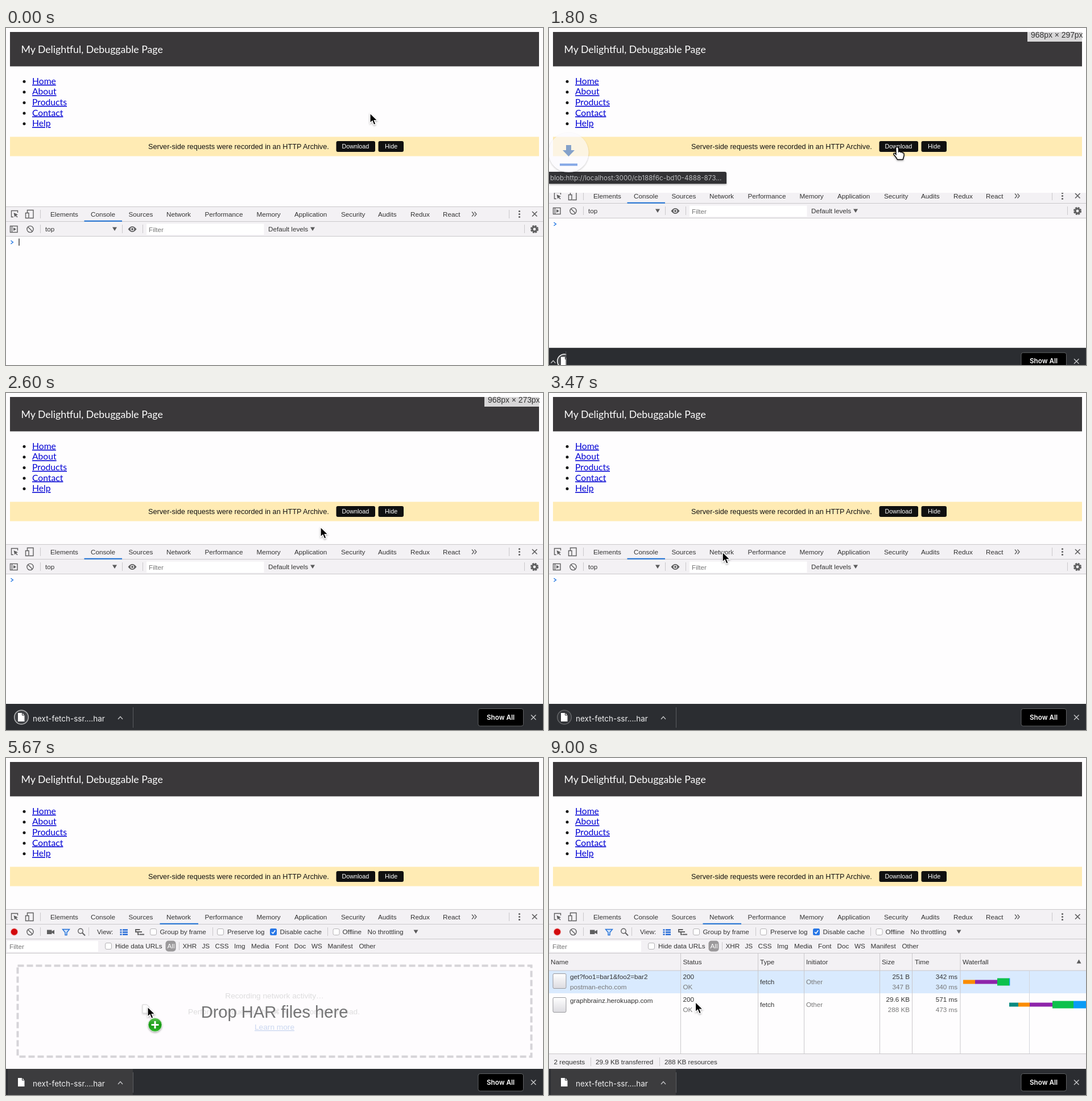
Recreate the animation shown at these times as an HTML page. Size 944 by 593 pixels, loop 9070 ms.

```html
<!DOCTYPE html>
<html lang="en">
<head>
<meta charset="utf-8">
<title>Debuggable page</title>
<style>
  html, body { margin: 0; width: 100%; height: 100%; overflow: hidden; background: #fefdfe; }
  svg { display: block; width: 944px; height: 593px; font: 11.7px "Liberation Sans", Arial, sans-serif; fill: #333; }
  .lato { font-family: Lato, "Open Sans", sans-serif; }
  .inter { font-family: Inter, Roboto, sans-serif; }
  .ico { fill: none; stroke: #5f5f60; stroke-width: 1.4; }
  .bar { fill: #f3f1f4; }
  .rule { fill: none; stroke: #cac8cb; }
  .dim { fill: #777; }
</style>
</head>
<body>
<svg viewBox="0 0 944 593" xmlns="http://www.w3.org/2000/svg">
  <defs>
    <linearGradient id="paper" x2="0" y2="1"><stop stop-color="#fff"/><stop offset="1" stop-color="#dcdbe0"/></linearGradient>
    <linearGradient id="green" x2="0" y2="1"><stop stop-color="#5cc250"/><stop offset=".5" stop-color="#169a14"/><stop offset="1" stop-color="#2fb52a"/></linearGradient>
    <filter id="soft" x="-50%" y="-50%" width="200%" height="200%"><feDropShadow dx="0" dy="1.5" stdDeviation="1.5" flood-opacity=".35"/></filter>
    <clipPath id="itemClip"><rect id="itemBox" y="0" width="226" height="46"/></clipPath>
    <path id="file" d="M0 0h7.5l4 4v11H0z"/>
    <g id="check"><rect x=".5" y=".5" width="11" height="11" rx="2.5" fill="#fff" stroke="#b5b3b6"/></g>
    <path id="down" d="M-4-3h8L0 3.5z" fill="#5a5a5b"/>
    <g id="block" class="ico"><circle r="5.6"/><path d="M-4-4l8 8"/></g>
  </defs>

  <rect width="944" height="593" fill="#fefdfe"/>
  <g id="page">
    <rect x="7" y="7" width="930" height="60.5" fill="#3a383a"/>
    <text class="lato" x="26.5" y="44" font-size="17.7" fill="#fff">My Delightful, Debuggable Page</text>
    <g id="links" class="lato" font-size="15.7"></g>
    <rect x="7" y="191.5" width="930" height="34" fill="#ffebb4"/>
    <text x="250" y="213" font-size="12.7" fill="#111">Server-side requests were recorded in an HTTP Archive.</text>
    <g fill="#101010"><rect x="580.5" y="199" width="68.5" height="19" rx="3"/><rect x="654.5" y="199" width="44.5" height="19" rx="3"/></g>
    <g font-size="10.75" fill="#fff"><text x="590.5" y="212.3">Download</text><text x="666" y="212.3">Hide</text></g>
  </g>

  <g id="tools">
    <rect width="944" height="340" fill="#fefdfe"/>
    <rect class="bar" width="944" height="52.5"/>
    <path class="rule" d="M0 .5h944M0 26.5h944M0 52.5h944M60.5 6v15M884.5 6v15"/>
    <g class="ico">
      <path d="M13 18.5H9.5v-11h11V11"/><path d="M13.5 11l7.5 3.2-3 1.2 2.6 3-1.2 1-2.5-3-1.7 2.4z" fill="#5f5f60" stroke="none"/>
      <path d="M37.5 11V6.5h10.5v14h-7M34.5 11.5h5.5v9h-5.5z"/>
      <path d="M819 9.500l3.500 4-3.500 4M823.500 9.500l3.500 4-3.500 4"/>
      <path d="M925 9l8.500 8.500M933.500 9l-8.500 8.500" stroke-width="1.700"/>
    </g>
    <g fill="#5f5f60"><circle cx="902.500" cy="8.500" r="1.600"/><circle cx="902.500" cy="13.500" r="1.600"/><circle cx="902.500" cy="18.500" r="1.600"/></g>
    <g id="tabs"></g>
    <rect id="mark" y="24.700" height="2" fill="#1a6fd4"/>

    <g id="console">
      <path class="rule" d="M60.500 32v15M204.500 32v15M240.500 32v15M911.500 32v15"/>
      <g class="ico"><rect x="7.500" y="34.500" width="12.500" height="11"/><path d="M10.500 34.500v11"/></g>
      <path d="M13 37l5 3-5 3z" fill="#5f5f60"/>
      <use href="#block" x="42.500" y="40"/>
      <use href="#down" x="191" y="39.500"/><use href="#down" x="539" y="39.500"/>
      <path d="M214.500 40q7.500-10 15 0q-7.500 10-15 0z" fill="#5f5f60"/><circle cx="222" cy="40" r="3.300" fill="#f3f1f4"/><circle cx="222" cy="40" r="1.900" fill="#5f5f60"/>
      <rect x="247" y="30.500" width="206.500" height="19.500" fill="#fff"/>
      <text x="69" y="44">top</text><text class="dim" x="251" y="44.500">Filter</text><text x="461" y="43.700">Default levels</text>
      <circle cx="929" cy="40" r="5.800" fill="none" stroke="#5f5f60" stroke-width="2.600" stroke-dasharray="3 1.550"/><circle cx="929" cy="40" r="3.900" fill="none" stroke="#5f5f60" stroke-width="3"/>
      <path d="M8.500 60l3.800 3-3.800 3" fill="none" stroke="#2a7be4" stroke-width="1.500"/>
      <path id="caret" d="M23 56.500v12.500" stroke="#222" stroke-width="1.300"/>
    </g>

    <g id="network">
      <rect class="bar" y="53" width="944" height="24.500"/>
      <path class="rule" d="M0 77.500h944M60.500 32v15M145.500 32v15M363.500 32v15M565.500 32v15M304.500 58v14"/>
      <circle cx="14.500" cy="40" r="7" fill="#f4c9cb"/><circle cx="14.500" cy="40" r="5.800" fill="#d3090d"/>
      <use href="#block" x="42.500" y="40"/>
      <path d="M72 36.500h8.500v2.500l4.500-2.500v7.500l-4.500-2.500v2.500H72z" fill="#5f5f60"/>
      <path d="M99.500 35.500h12l-4.500 5.500v4.500h-3V41z" fill="#cfe2fa" stroke="#2472d8" stroke-width="1.400"/>
      <g class="ico"><circle cx="131" cy="38.500" r="4.200"/><path d="M134 41.500l5 5" stroke-width="2"/></g>
      <path d="M200.500 36.500h3M205 36.500h9M200.500 40.500h3M205 40.500h9M200.500 44.500h3M205 44.500h9" stroke="#2168d6" stroke-width="2.600"/>
      <path d="M227 36h8.500M230 40h9M234.500 44.500h8.500M228 36v4h2M232 40v4.500h2" fill="none" stroke="#5f5f60" stroke-width="1.800"/>
      <use href="#check" x="253" y="34"/><use href="#check" x="371" y="34"/><use href="#check" x="574.500" y="34"/><use href="#check" x="174" y="59"/>
      <rect x="464" y="34" width="12" height="12" rx="2.500" fill="#2877e6"/><path d="M467 40.200l2.300 2.500 4-5.500" fill="none" stroke="#fff" stroke-width="1.600"/>
      <use href="#down" x="720.500" y="39.500"/>
      <rect x="2" y="56" width="160" height="19" fill="#fff"/><text class="dim" x="6" y="70">Filter</text>
      <rect x="280.500" y="55.500" width="18" height="19" rx="5" fill="#9b999b"/><text x="283.500" y="69" fill="#fff">All</text>
      <g id="options"></g>

      <g id="empty" fill="#6b6b6c" font-size="13.700">
        <text x="472" y="157" text-anchor="middle">Recording network activity…</text>
        <text x="320" y="184.500">Perform a request or hit</text>
        <text x="469" y="184.500" font-weight="bold" font-size="13" style="font-family:'Liberation Sans','DejaVu Sans',sans-serif">⌘</text>
        <text x="486" y="184.500" font-weight="bold">R</text><text x="499.500" y="184.500">to record the reload.</text>
        <text x="472" y="212" text-anchor="middle" fill="#1450c0" text-decoration="underline">Learn more</text>
      </g>
      <g id="drop">
        <rect y="78" width="944" height="204" fill="#fefdfe" opacity=".78"/>
        <rect x="20.500" y="99.500" width="903" height="160" fill="none" stroke="#d6d4d8" stroke-width="4" stroke-dasharray="11 5"/>
        <text x="472" y="190.500" text-anchor="middle" font-size="29.100" fill="#747475">Drop HAR files here</text>
      </g>
      <g id="table" transform="translate(0 -266)">
        <rect class="bar" y="344" width="944" height="30"/><rect y="374" width="944" height="40" fill="#d9eafe"/><rect class="bar" y="521" width="944" height="27"/>
        <path class="rule" d="M0 374h944M0 520.500h944M231.500 344v176M367.500 344v176M448.500 344v176M581.500 344v176M638.500 344v176M723 344v176M73.500 527v15M194.500 527v15"/>
        <path d="M844.500 375v145" stroke="#d3d6dc"/>
        <path d="M927.500 361.500h8l-4-7z" fill="#5a5a5b"/>
        <g fill="url(#paper)" stroke="#98989c"><rect x="7" y="379.500" width="23" height="26" rx="2"/><rect x="7" y="421.500" width="23" height="26" rx="2"/></g>
        <g id="cells"></g><g id="falls"></g>
      </g>
    </g>
  </g>

  <rect id="gap" width="944" fill="#fefdfe"/>
  <g id="size"><rect x="841" width="103" height="24" fill="#fff" opacity=".8"/><text id="sizeText" x="847" y="17" font-size="13.900"></text></g>
  <g id="bubble">
    <path d="M0-21h309q3 0 3 3V0H0z" fill="#303235" filter="url(#soft)"/>
    <text class="inter" x="2" y="-6" fill="#bdbec0">blob:http://localhost:3000/cb188f6c-bd10-4888-873...</text>
  </g>
  <g id="badge">
    <circle r="35" fill="#fbfaff" filter="url(#soft)"/>
    <path d="M-4.500-13h9v9h6L0 7-10.500-4h6zM-15.500 19.500h31v4h-31z" fill="#3a74d8"/>
  </g>

  <g id="shelf">
    <rect width="944" height="48" fill="#2b2d31"/>
    <rect id="hover" x="3" width="220" height="46" fill="#3c3c3e"/>
    <g clip-path="url(#itemClip)">
      <g id="ring"><circle cx="27" cy="23.500" r="12.300" fill="#fff" fill-opacity=".17" stroke="#fff" stroke-width="1.500"/></g>
      <use href="#file" x="21" y="16" fill="#fff"/><path d="M28.500 16v4h4" fill="none" stroke="#2b2d31"/>
      <text id="name" class="inter" x="47" y="31" font-size="13.500" fill="#f0f0f1">next-fetch-ssr....har</text>
      <g id="edge"><path d="M-27 27l4-4.500 4 4.500" fill="none" stroke="#c4c5c7" stroke-width="1.300"/><path d="M-.5 6v36" stroke="#5b5d61"/></g>
    </g>
    <rect x="830" y="8.500" width="79.500" height="30.500" rx="3.500" fill="#000" stroke="#606265"/>
    <text class="inter" x="845" y="27.500" font-weight="600" fill="#fff">Show All</text>
    <path d="M923 19.500l8.500 8.500M931.500 19.500l-8.500 8.500" stroke="#c8c9cb" stroke-width="1.400"/>
  </g>

  <g id="cursor">
    <g id="ghost" opacity=".5"><use href="#file" x="-9" y="-4" fill="#fff" stroke="#aaa" filter="url(#soft)"/></g>
    <path id="arrow" d="M0 0v17.300l4-3.700 2.700 6.700 3.200-1.400-2.700-6.400h5.600z" fill="#000" stroke="#fff" stroke-width="1.200" filter="url(#soft)"/>
    <path id="hand" d="M-2.300 1q2.300-3.500 4.600 0l.4 7q2-1.500 3.500.7q2.200-1 3 1q2.500-.7 2.800 2V15q-1 3-1.800 6.500H.5Q-2 17-6 12.500q-.8-3 2.200-2l1.800 2z" fill="#fff" stroke="#000" stroke-width="1.400" filter="url(#soft)"/>
    <g id="plus" transform="translate(13 31.500)"><circle r="12" fill="url(#green)" stroke="#e4f2e2" stroke-width=".8" filter="url(#soft)"/><path d="M-6.500 0h13M0-6.500v13" stroke="#fff" stroke-width="3"/></g>
  </g>
</svg>

<script>
const LOOP = 9070;
const $ = id => document.getElementById(id);
const text = (x, y, s, extra = '') => `<text x="${x}" y="${y}" ${extra}>${s.replace(/&/g, '&amp;')}</text>`;
const right = 'text-anchor="end"', dim = 'class="dim"';

$('links').innerHTML = ['Home', 'About', 'Products', 'Contact', 'Help'].map((s, i) => {
  const y = 98.7 + i * 18.6;
  return `<circle cx="32" cy="${y - 4.5}" r="2.5" fill="#111"/>` + text(46, y, s, 'fill="#0000d4" text-decoration="underline"');
}).join('');

$('tabs').innerHTML = [
  [78, 'Elements'], [149, 'Console'], [215.5, 'Sources'], [282, 'Network'], [349.5, 'Performance'], [440.5, 'Memory'],
  [507, 'Application'], [589, 'Security'], [654, 'Audits'], [711, 'Redux'], [768, 'React']
].map(([x, s]) => text(x, 17.5, s)).join('');

$('options').innerHTML = [
  [160, 'View:'], [270.5, 'Group by frame'], [389, 'Preserve log'], [481.5, 'Disable cache'], [591.5, 'Offline'], [635.5, 'No throttling']
].map(([x, s]) => text(x, 44, s)).join('') + [
  [192, 'Hide data URLs'], [310.5, 'XHR'], [344.5, 'JS'], [367.5, 'CSS'], [401, 'Img'], [431, 'Media'],
  [473, 'Font'], [506.5, 'Doc'], [537, 'WS'], [565.5, 'Manifest'], [620.5, 'Other']
].map(([x, s]) => text(x, 69, s)).join('');

const row = (y, size, full, time, wait) =>
  text(235.5, y, '200') + text(235.5, y + 18, 'OK', dim) +
  text(371, y + 9, 'fetch') + text(452, y + 9, 'Other', dim) +
  text(634, y, size, right) + text(634, y + 18, full, right + dim) +
  text(718, y, time, right) + text(718, y + 18, wait, right + dim);

$('cells').innerHTML = [
  [3, 'Name'], [235.5, 'Status'], [371, 'Type'], [452, 'Initiator'], [585, 'Size'], [643, 'Time'], [727, 'Waterfall']
].map(([x, s]) => text(x, 362.5, s)).join('') +
  text(37, 388.7, 'get?foo1=bar1&foo2=bar2') + text(37, 406.5, 'postman-echo.com', dim) +
  text(37, 430.8, 'graphbrainz.herokuapp.com') +
  row(388.7, '251 B', '347 B', '342 ms', '340 ms') +
  row(428.7, '29.6 KB', '288 KB', '571 ms', '473 ms') +
  text(8.5, 538.5, '2 requests') + text(82, 538.5, '29.9 KB transferred') + text(203, 538.5, '288 KB resources');

// start, end, centre, height, colour
$('falls').innerHTML = [
  [728, 749, 394, 7, '#fb8c00'], [749, 788, 394, 7, '#8e24aa'], [788, 809, 394, 13, '#0cc14c'], [809, 810.3, 394, 13, '#0a9bf5'],
  [809, 825, 434, 7, '#0b8a80'], [825, 845, 434, 7, '#fb8c00'], [845, 885, 434, 7, '#8e24aa'], [885, 922, 434, 13, '#0cc14c'], [922, 944, 434, 13, '#0a9bf5']
].map(([a, b, y, h, c]) => `<rect x="${a}" y="${y - h / 2}" width="${b - a}" height="${h}" fill="${c}"/>`).join('');

// time, x, y
const path = [
  [0, 640, 150], [250, 640, 150], [1050, 618, 208], [1500, 612, 210], [1950, 612, 210], [2500, 553, 236], [2670, 553, 236],
  [3480, 305, 280], [3680, 304, 282], [4330, 194, 405], [4470, 160, 467], [4930, 111, 571], [5070, 111, 571],
  [5670, 249, 438], [5930, 257, 428], [6270, 257.5, 429.5], [LOOP, 257.5, 429.5]
];
const clamp = v => Math.max(0, Math.min(1, v));
const ease = p => p * p * (3 - 2 * p);

function pointer(t) {
  const i = Math.max(1, path.findIndex(k => k[0] > t));
  const [t0, x0, y0] = path[i - 1], [t1, x1, y1] = path[i];
  const p = (t - t0) / (t1 - t0);
  // keep speed through the pass-by points
  const e = t0 === 3680 ? p * p : t0 === 4330 ? p : t0 === 4470 ? 1 - (1 - p) ** 2 : ease(p);
  return [x0 + (x1 - x0) * e, y0 + (y1 - y0) * e];
}

const show = (id, on) => $(id).style.display = on ? '' : 'none';
const move = (id, x, y) => $(id).setAttribute('transform', `translate(${x} ${y})`);

function draw(t) {
  const rise = clamp((t - 1665) / 207);
  const sliding = rise > 0 && rise < 1;
  const top = 314 - Math.round(48 * rise);
  const pageEnd = top + (sliding ? 8 : 0);
  const net = t >= 3600;
  const [x, y] = pointer(t);

  move('tools', 0, top);
  show('console', !net);
  show('network', net);
  $('mark').setAttribute('x', net ? 270.5 : 137.5);
  $('mark').setAttribute('width', net ? 67.5 : 66.5);
  show('caret', t < 1530 && t % 1060 < 530);

  show('gap', sliding);
  $('gap').setAttribute('y', top - 1);
  $('gap').setAttribute('height', pageEnd - top + 1);

  show('size', rise > 0 && t < 2930);
  $('sizeText').textContent = `968px × ${Math.round(pageEnd / 0.975)}px`;

  const hand = x > 580 && x < 649 && y > 199 && y < 218;
  show('bubble', hand && t > 1040);
  move('bubble', 0, top - (sliding ? 8 : 0));

  const fly = (t - 1700) / 600;
  show('badge', fly > 0 && fly < 1);
  move('badge', 34.5, 212 + 42 * fly);
  $('badge').setAttribute('opacity', 0.62 * clamp((1 - fly) / 0.8));

  show('shelf', rise > 0);
  move('shelf', 0, 593 - 46 * rise);
  const width = 224 * (1 - (1 - clamp((t - 1742) / 840)) ** 2);
  $('itemBox').setAttribute('width', width);
  move('edge', width, 0);
  const pulse = clamp((t - 1800) / 2500);
  $('ring').setAttribute('opacity', Math.cos(pulse * 5 * Math.PI) / 2 + 0.5);
  show('hover', t >= 5070);

  const drag = t >= 5130 && t < 5900, over = drag && y < 547;
  const loaded = t >= 6590;
  show('drop', over);
  show('empty', !loaded);
  show('table', loaded);
  show('ghost', drag);
  show('plus', over);
  show('hand', hand);
  show('arrow', !hand);
  move('cursor', x, y);
}

const start = performance.now();
function tick() {
  draw((performance.now() - start) % LOOP);
  requestAnimationFrame(tick);
}
tick();
</script>
</body>
</html>
```
